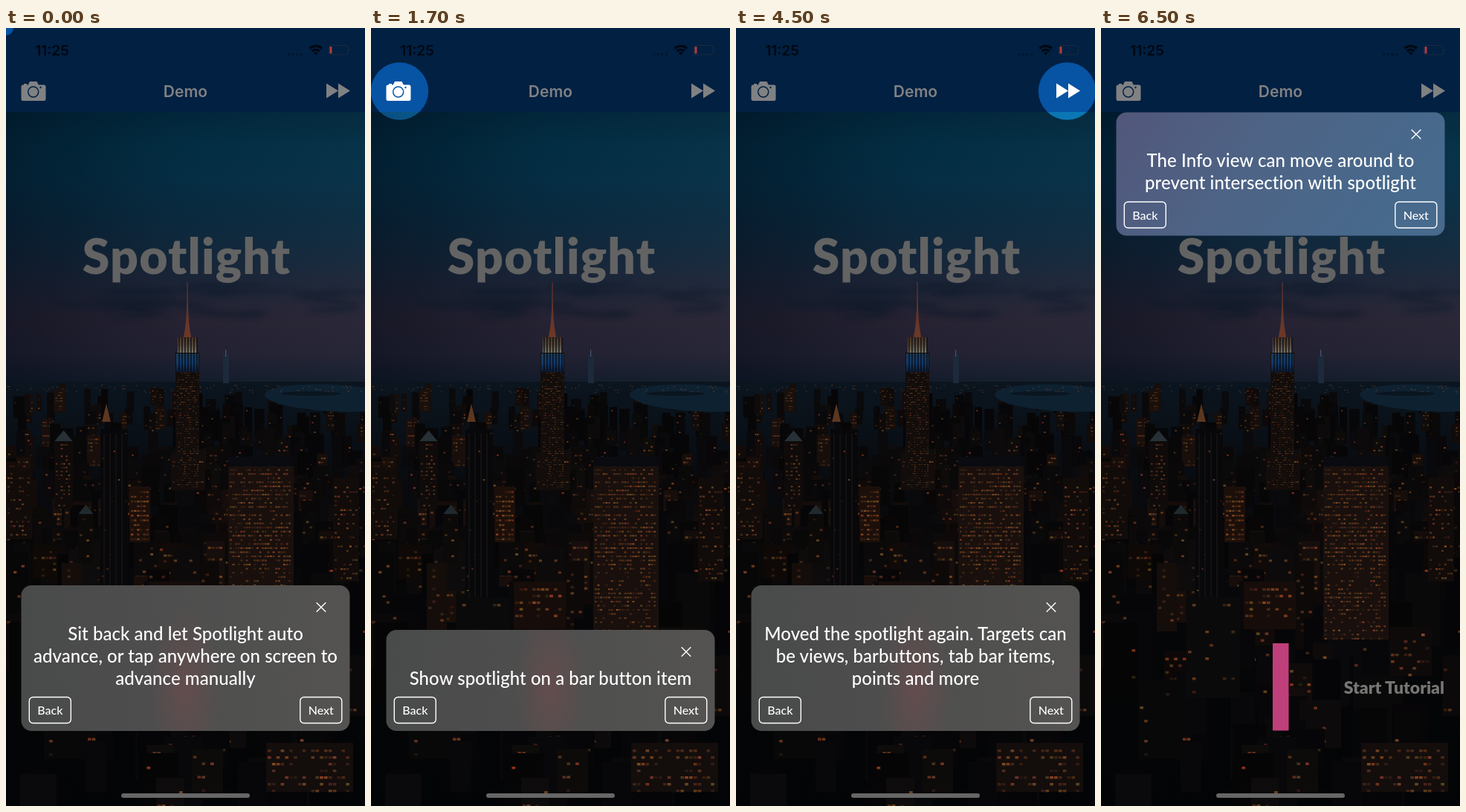
An HTML page with a canvas that plays this animation: 483 px wide and 1047 px high, repeating every 8 s.

```html
<!DOCTYPE html>
<html lang="en">
<head>
<meta charset="utf-8">
<title>Spotlight demo</title>
<style>
  html, body { margin: 0; width: 100%; height: 100%; overflow: hidden; background: #04070c; }
  canvas, svg { position: absolute; left: 0; top: 0; width: 483px; height: 1047px; }
  text { font-family: Lato, "Open Sans", sans-serif; text-anchor: middle; }
  .system { font-family: Inter, Roboto, sans-serif; font-weight: 600; }
  .info { font-size: 24px; font-weight: 500; letter-spacing: .05px; fill: #fff; }
  .button { font-size: 16px; font-weight: 500; fill: #fff; }
  .heavy { font-weight: 900; }
  .line { fill: none; stroke: #fff; stroke-width: 1.4; }
  .status { fill: none; stroke: #000812; stroke-width: 3; }
</style>
</head>
<body>
<canvas id="photo" width="483" height="1047"></canvas>
<svg viewBox="0 0 483 1047">
  <defs>
    <clipPath id="spotClip"><circle id="spot"/></clipPath>
    <linearGradient id="brightSky">
      <stop stop-color="#0a4f80"/><stop offset="1" stop-color="#0a7ab8"/>
    </linearGradient>
    <linearGradient id="greyGlass">
      <stop stop-color="#494a4a"/><stop offset="1" stop-color="#545352"/>
    </linearGradient>
    <linearGradient id="blueGlass" x2="1" y2=".25">
      <stop stop-color="#52577b"/><stop offset=".5" stop-color="#4d6486"/><stop offset="1" stop-color="#476a8d"/>
    </linearGradient>
    <radialGradient id="glow" gradientUnits="userSpaceOnUse" r="1"
      cx="0" cy="0" gradientTransform="translate(241 888) scale(48 110)">
      <stop stop-color="#8a484c" stop-opacity=".36"/>
      <stop offset="1" stop-color="#8a484c" stop-opacity="0"/>
    </radialGradient>
    <g id="icons">
      <rect x="20.500" y="76.500" width="33" height="21.500" rx="2.500"/>
      <path d="M24 78v-3h4v3M29 78l3-6h9.500l3 6z"/>
      <path d="M431 74.500l16 10-16 10zM447 74.500l16 10-16 10z"/>
      <text class="system" x="241.500" y="93" font-size="21">Demo</text>
    </g>
    <g id="lens">
      <circle cx="36.700" cy="86" r="7" fill="none" stroke-width="1.500"/>
      <circle cx="46.500" cy="80" r=".8"/>
    </g>
  </defs>

  <rect width="483" height="113" fill="#012042"/>
  <text class="system" x="62" y="37" font-size="19" fill="#000812">11:25</text>
  <path class="status" d="M381 35.500h17" stroke-linecap="round" stroke-dasharray="0 5.500" style="stroke:#03152b"/>
  <path class="status" d="M408.500 27.500a12 12 0 0 1 16.500 0M411.700 31.200a7.400 7.400 0 0 1 10.100 0"/>
  <path d="M413.900 33.600a4.200 4.200 0 0 1 5.700 0l-2.850 3z" fill="#000812"/>
  <g fill="#1d2b3d">
    <rect x="434" y="23.500" width="26.500" height="12.500" rx="4" fill="none" stroke="#1d2b3d"/>
    <path d="M462.500 27.500q2 2 0 4.500z"/>
    <rect x="435.500" y="25" width="3" height="9.500" rx="1.300" fill="#b83a3c"/>
  </g>
  <use href="#icons" fill="#808183"/>
  <use href="#lens" fill="#012042" stroke="#012042"/>

  <text class="heavy" x="243" y="331" font-size="66" letter-spacing="1.200" fill="#636363">Spotlight</text>
  <rect x="231" y="828" width="21.500" height="117.500" fill="#bf3f7a"/>
  <text class="heavy" x="462" y="896" font-size="23" fill="#777673" style="text-anchor:end">Start Tutorial</text>
  <rect x="155" y="1030" width="173" height="6" rx="3" fill="#666"/>

  <g clip-path="url(#spotClip)">
    <rect width="483" height="113" fill="#0753a4"/>
    <rect y="113" width="483" height="60" fill="url(#brightSky)"/>
    <use href="#icons" fill="#fff"/>
    <use href="#lens" fill="#0753a4" stroke="#0753a4"/>
  </g>

  <rect id="panel" x="20.500" width="442" rx="14"/>
  <rect id="panelGlow" x="180" width="122" fill="url(#glow)"/>
  <g id="lines"></g>
  <path id="close" class="line" d="M-6.300-6.300l12.600 12.600M6.300-6.300l-12.600 12.600"/>
  <g id="buttons"></g>
</svg>
<script>
const $ = id => document.getElementById(id);
const LOOP = 8000;

const steps = [
  { x: 0, y: 0, r: 10,
    text: ['Sit back and let Spotlight auto', 'advance, or tap anywhere on screen to', 'advance manually'] },
  { x: 38.5, y: 85, r: 38.7, text: ['Show spotlight on a bar button item'] },
  { x: 241.5, y: 85, r: 49, text: ['Moved spotlight to the title using a', 'point and radius'] },
  { x: 445.5, y: 85, r: 38.7,
    text: ['Moved the spotlight again. Targets can', 'be views, barbuttons, tab bar items,', 'points and more'] },
  { x: 0, y: 0, r: 0, bottom: 279.5,
    text: ['The Info view can move around to', 'prevent intersection with spotlight'] }
];

function set(id, attrs) {
  for (const key in attrs) $(id).setAttribute(key, attrs[key]);
}

const button = (label, x) =>
  `<rect class="line" x="${x - 28}" y="-45.5" width="56" height="35" rx="5"/>
   <text class="button" x="${x}" y="-22">${label}</text>`;
$('buttons').innerHTML = button('Back', 59.3) + button('Next', 423.8);

function show({ x, y, r, text, bottom = 946 }) {
  const lineGap = 30, height = 106 + lineGap * text.length, top = bottom - height;
  const raised = bottom < 500;
  set('spot', { cx: x, cy: y, r });
  set('panel', { y: top, height, fill: `url(#${raised ? 'blue' : 'grey'}Glass)` });
  set('panelGlow', { y: top, height });
  set('close', { transform: `translate(424 ${top + 29.5})` });
  set('buttons', { transform: `translate(0 ${bottom})` });
  $('lines').innerHTML = text.map((line, i) =>
    `<text class="info" x="241.5" y="${bottom - 62.5 - lineGap * (text.length - 1 - i)}">${line}</text>`).join('');
}

// Night skyline
const ctx = $('photo').getContext('2d');
let seed = 41;
function rand(min = 0, max = 1) {
  seed = (seed + 0x6D2B79F5) | 0;
  let n = Math.imul(seed ^ seed >>> 15, 1 | seed);
  n = n + Math.imul(n ^ n >>> 7, 61 | n) ^ n;
  return min + ((n ^ n >>> 14) >>> 0) / 4294967296 * (max - min);
}

function box(x, y, w, h, fill) {
  ctx.fillStyle = fill;
  ctx.fillRect(x, y, w, h);
}

function ellipse(x, y, rx, ry, fill, tilt = 0) {
  ctx.fillStyle = fill;
  ctx.beginPath();
  ctx.ellipse(x, y, rx, ry, tilt, 0, 7);
  ctx.fill();
}

function roof(x, y, w, h, fill) {
  for (let i = 0; i < h; i++) box(x + w / 2 * (1 - i / h), y - h + i, w * i / h, 1, fill);
}

// Colours spread evenly along a line
function fade(x0, y0, x1, y1, ...colors) {
  const g = ctx.createLinearGradient(x0, y0, x1, y1);
  colors.forEach((color, i) => g.addColorStop(i / (colors.length - 1), color));
  return g;
}

const amber = alpha =>
  `rgba(${rand(120, 190) | 0},${rand(66, 105) | 0},${rand(28, 55) | 0},${alpha})`;

function building(x, y, w, h, lit) {
  const shade = rand(4, 9);
  box(x, y, w, h, `rgb(${shade + 34 * lit},${shade + 15 * lit},${shade + 2 + 4 * lit})`);
  const rowGap = Math.min(9, 3 + Math.max(0, y - 450) / 50), colGap = rowGap * .65;
  for (let row = y + rowGap; row < y + h - 2; row += rowGap) {
    const busy = lit * rand(.4, 1.6);
    for (let col = x + 2; col < x + w - colGap; col += colGap)
      if (rand() < busy) box(col, row, colGap * .8, rowGap * .38, amber(rand(.15, .75)));
  }
}

function drawSky() {
  box(0, 113, 483, 372, fade(0, 113, 0, 485, '#02293f', '#033148', '#063149', '#0b2d43',
    '#142a3f', '#20273a', '#2b2536', '#262335', '#111c2a'));
  box(0, 113, 483, 372, fade(0, 0, 483, 0, 'rgba(0,8,20,.45)', 'rgba(0,12,22,.1)', 'rgba(40,62,70,.1)'));
  ctx.filter = 'blur(3px)';
  for (let i = 0; i < 22; i++)
    ellipse(rand(90, 490), rand(342, 390), rand(18, 60), rand(1.5, 4.5), 'rgba(11,26,40,.4)', rand(-.08, .16));
  ctx.filter = 'none';
}

function drawCity() {
  box(0, 476, 483, 571, fade(0, 476, 0, 1047, '#0b151f', '#080a0e', '#060709', '#040506', '#030405'));
  for (let i = 0; i < 300; i++) {
    const depth = i / 300, size = 1 + 2 * depth;
    building(rand(-10, 480), 482 + depth * 220 + rand(-7, 7), rand(6, 13) * size, rand(15, 40) * size,
      .04 + .5 * rand() ** 4);
  }
  ellipse(440, 498, 92, 18, '#0e2131', .05);
  ellipse(410, 492, 40, 3, '#0a1520');
  for (let i = 0; i < 90; i++) box(rand(0, 483), rand(480, 490), 1.5, 1, amber(.5));
  for (let i = 0; i < 60; i++)
    building(rand(-20, 470), 690 + i * 5.5, rand(22, 60), rand(50, 130), .01 + .3 * rand() ** 5);
}

function drawLandmarks() {
  building(65, 555, 25, 92, .25);
  roof(65, 556, 25, 15, '#263035');
  building(97, 653, 21, 68, .15);
  roof(97, 654, 21, 13, '#202a2e');
  roof(129, 530, 12, 25, '#5c3720');
  building(0, 593, 36, 95, .3);
  building(166, 617, 28, 75, .65);
  building(75, 720, 27, 92, .4);
  building(192, 745, 70, 64, .45);
  building(440, 605, 35, 140, .3);
  building(127, 540, 37, 226, .02);
  for (let x = 131; x < 162; x += 8) box(x, 546, 2, 220, 'rgba(40,34,34,.3)');
  building(299, 577, 88, 246, .48);
  box(299, 577, 88, 13, '#090b10');
  building(115, 766, 72, 135, .05);
  building(388, 806, 57, 66, .2);
  building(350, 962, 117, 66, .3);
}

function drawTowers() {
  box(292, 440, 8, 38, '#1d2a3b');
  box(295, 433, 1.3, 9, '#46536a');
  building(222, 572, 46, 50, .3);
  building(228, 437, 32, 185, .3);
  box(229, 438, 30, 25, fade(0, 438, 0, 463, '#1e3a56', '#123c6c', '#0d1a30'));
  // The mast flares out towards the crown
  for (let y = 342; y < 437; y++) {
    const t = (y - 342) / 95, half = .7 + 11 * t ** 3.5;
    box(244 - half, y, half * 2, 1, `rgb(${90 + 25 * t},${50 + 8 * t},${50 - 16 * t})`);
  }
  box(231, 416, 26, 21, fade(0, 416, 0, 437, '#4a3425', '#57493a', '#77705f'));
  for (let x = 232; x < 258; x += 4) box(x, 416, 1.8, 46, 'rgba(7,10,18,.7)');
}

drawSky();
drawCity();
drawLandmarks();
drawTowers();

// A short opening step, then one step every two seconds
const start = performance.now();
let current;
function tick() {
  const time = (performance.now() - start) % LOOP;
  const step = steps[Math.floor((time + 1500) / 2000)];
  if (step !== current) show(current = step);
  requestAnimationFrame(tick);
}
tick();
</script>
</body>
</html>
```
